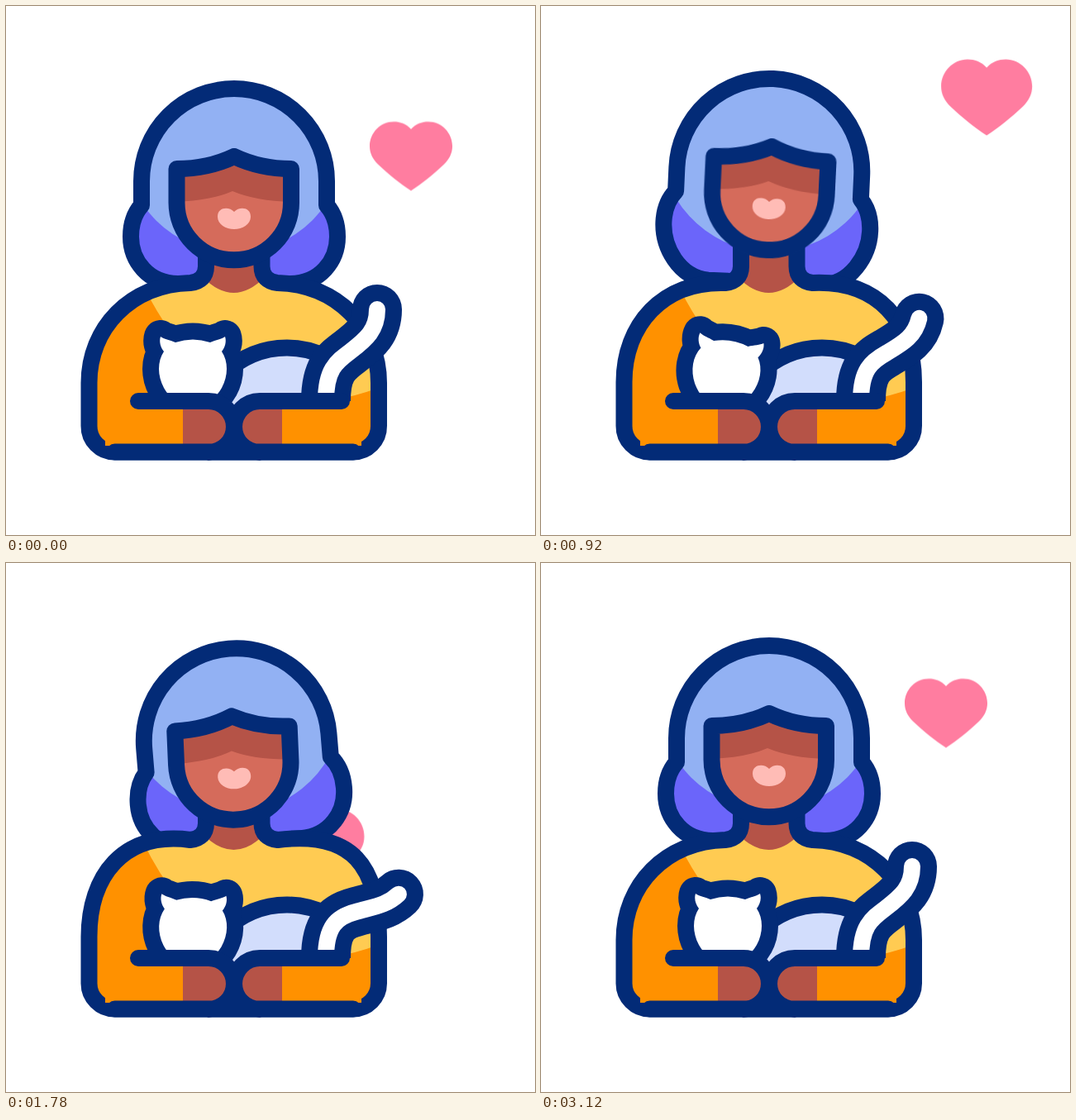
An HTML page for the animation above (3600 ms loop, 640 by 640 pixels).

```html
<!DOCTYPE html>
<html lang="en">
<head>
<meta charset="utf-8">
<title>Cuddling a cat</title>
<style>
html, body { margin: 0; width: 100%; height: 100%; overflow: hidden; background: #fff; }
svg { display: block; width: 100vw; height: 100vh; }

:root {
  --ink: #032b77; --hair: #92b1f3; --tips: #6b65fa; --skin: #d56b5b; --shade: #b55347;
  --lips: #ffbcb6; --shirt: #ffcb52; --sleeve: #ff9100; --fur: #d2ddfc; --love: #ff7da0;
}
.line { fill: none; stroke: var(--ink); stroke-width: 20; stroke-linecap: round; stroke-linejoin: round; }

.out, .in, .head, .locks, .strands, .crown, .face, .kitty, .torso, .tail {
  animation: 3600ms cubic-bezier(.37, 0, .63, 1) infinite;
}
.head { animation-name: bob; }
.locks { animation-name: swing; transform-origin: 276px 178px; }
.strands { animation-name: stretch; }
.crown { animation-name: slide; }
.face { animation-name: tilt; transform-origin: 276px 250px; }
.kitty { animation-name: nuzzle; transform-origin: 226px 445px; }
.torso { animation-name: shrug; }
.tail { animation-name: wag; fill: none; stroke-linecap: round; }

/* one heart floats away while the next rises from behind the shoulder */
.heart {
  fill: var(--love);
  d: path("M0 -32.5 C-6 -39 -13 -41.5 -21 -41.5 C-37 -41.5 -50 -28 -50 -12 C-50 -3 -46 4 -40 10 C-26 23 -14 33 0 42 C14 33 26 23 40 10 C46 4 50 -3 50 -12 C50 -28 37 -41.5 21 -41.5 C13 -41.5 6 -39 0 -32.5Z");
}
.out { animation-name: leave, beatOut, fade; animation-timing-function: cubic-bezier(.333, 0, .667, 1), cubic-bezier(.37, 0, .63, 1), linear; }
.in { animation-name: arrive, beatIn, appear; animation-timing-function: cubic-bezier(.333, 0, .667, 1), cubic-bezier(.37, 0, .63, 1), step-end; }

@keyframes leave { 0%, 1.11% { translate: 0 0; } 40.7%, 100% { translate: 73px -105.6px; } }
@keyframes beatOut { 0%, 20.8%, 42.22%, 100% { scale: 1; } 10.56%, 31.67% { scale: 1.25; } }
@keyframes fade { 0%, 32.22% { opacity: 1; } 38.89%, 100% { opacity: 0; } }
@keyframes arrive { 0%, 32.22% { translate: -150px 217px; } 85%, 100% { translate: 0 0; } }
@keyframes beatIn { 0%, 44.44%, 65.56%, 86.67%, 100% { scale: 1; } 55%, 76.11% { scale: 1.25; } }
@keyframes appear { 0% { opacity: 0; } 38.89%, 100% { opacity: 1; } }

@keyframes bob {
  0%, .5%, 61.1%, 100% { translate: 0 0; }
  15.6% { translate: 0 10.3px; }
  25.6% { translate: 0 -12px; }
  36.1%, 46.1% { translate: 0 3.8px; }
}
@keyframes tilt {
  0%, .5%, 60%, 100% { rotate: 0deg; }
  15.5% { rotate: -5.6deg; }
  30% { rotate: 5deg; }
  41.67% { rotate: -4deg; }
}
@keyframes swing {
  0%, .5%, 75%, 100% { rotate: 0deg; translate: 0 0; }
  15.8% { rotate: -6.5deg; translate: 0 0; }
  25.6% { translate: 1.8px 0; }
  31.1% { rotate: 6.2deg; }
  34.4% { translate: -2.2px 0; }
  45.6% { rotate: -5.4deg; translate: 0 0; }
  63.9% { rotate: .8deg; }
}
/* the tips lag behind as the head rises */
@keyframes stretch {
  0%, 15.6%, 36.1%, 100% { d: path("M232 336 H208 C172 336 151 308 151 279 C151 262 156 250 164 241 V212 a112 112 0 0 1 224 0 V241 C396 250 401 262 401 279 C401 308 380 336 344 336 H320"); }
  25.6% { d: path("M232 347 H208 C172 345 151 309 151 279 C151 262 156 250 164 241 V212 a112 112 0 0 1 224 0 V241 C396 250 401 262 401 279 C401 309 380 345 344 347 H320"); }
}
@keyframes slide {
  0%, 15.6%, 36.1%, 100% { translate: 0 0; }
  25.6% { translate: 0 11px; }
}
@keyframes nuzzle {
  0%, .5%, 61.1%, 100% { translate: 0 0; rotate: 0deg; }
  15.7% { translate: 1px 8px; rotate: -12deg; }
  25.4% { translate: -2.5px 1px; }
  26.67% { rotate: 10deg; }
  34.7% { translate: 0 14px; }
  36.1% { rotate: -5deg; }
  48.9% { translate: 0 1.5px; rotate: 1.8deg; }
}
@keyframes shrug {
  0%, .5%, 63.9%, 100% { d: path("M242 284 V315 C242 327 235 334 223 335 C150 337 100.5 390 100.5 456 V508 A31 31 0 0 0 131.5 539.5 H420 A31 31 0 0 0 451 508 V456 C451 390 401.5 337 328.5 335 C316.5 334 309.5 327 309.5 315 V284"); }
  25.3% { d: path("M242 284 V315 C242 327 235 334 223 335 C147 332.5 100.5 386 100.5 455 V508 A31 31 0 0 0 131.5 539.5 H420 A31 31 0 0 0 451 508 V455 C451 382 407 331.5 328.5 335 C316.5 334 309.5 327 309.5 315 V284"); }
  15.6%, 33.9%, 47.2% { d: path("M242 284 V315 C242 327 235 334 223 335 C141 323.5 100.5 379 100.5 452 V508 A31 31 0 0 0 131.5 539.5 H420 A31 31 0 0 0 451 508 V452 C451 367 421 322.5 328.5 335 C316.5 334 309.5 327 309.5 315 V284"); }
}
@keyframes wag {
  0%, .5%, 60%, 100% { d: path("M387 478 C387 440 399 431 416.5 418 C436 403 449 392 449 367"); }
  15.7%, 43.3% { d: path("M387 478 C387 440 400 427 425 424 C450 421 465 424 486 415"); }
  29.5% { d: path("M387 478 C387 440 399 431 417 418.5 C437 404 450 393 451 369.5"); }
}
</style>
</head>
<body>
<svg viewBox="0 0 640 640">
  <defs>
    <clipPath id="hairClip"><path class="strands"/></clipPath>
    <clipPath id="faceClip"><path d="M206.5 197 C231 197 255 192 276 182 C297 192 321 197 345 197 V238 a69.25 69.25 0 0 1 -138.5 0Z"/></clipPath>
    <clipPath id="torsoClip"><path class="torso"/></clipPath>
  </defs>

  <g transform="translate(490 181.5)">
    <path class="heart out"/>
    <path class="heart in"/>
  </g>

  <g class="head">
    <g class="locks">
      <g clip-path="url(#hairClip)">
        <path fill="var(--tips)" d="M130 80 H420 V360 H130Z"/>
        <circle class="crown" cx="276" cy="165" r="133.5" fill="var(--hair)"/>
      </g>
      <path class="strands line"/>
    </g>
  </g>

  <g clip-path="url(#torsoClip)">
    <path fill="var(--shirt)" d="M90 280 H462 V545 H90Z"/>
    <path fill="var(--sleeve)" d="M158 320 Q180 372 212 410 V485 H395 V477 Q425 472 462 458 V545 H90 V320Z"/>
    <path fill="var(--shade)" d="M238 280 H313 V328 Q275.5 366 238 328Z"/>
  </g>
  <path class="torso line"/>

  <g class="head">
    <g class="face">
      <g clip-path="url(#faceClip)">
        <path fill="var(--skin)" d="M200 175 H352 V312 H200Z"/>
        <path fill="var(--shade)" d="M200 175 H352 V237 Q305 237 274 224 Q247 236 200 237Z"/>
      </g>
      <path class="line" d="M206.5 197 C231 197 255 192 276 182 C297 192 321 197 345 197 V238 a69.25 69.25 0 0 1 -138.5 0Z"/>
      <path fill="var(--lips)" d="M276 249 C270 242.5 256 243 256 255 C256 264 266 270 276 270 C286 270 296 264 296 255 C296 243 282 242.5 276 249Z"/>
    </g>
  </g>

  <path fill="var(--fur)" d="M262 446 C288 421 315 413.5 340 413.5 C358 413.5 372 417 388 425 V486 H262Z"/>
  <path class="line" d="M262 446 C288 421 315 413.5 340 413.5 C358 413.5 372 417 388 425"/>
  <path class="tail" stroke="var(--ink)" stroke-width="60"/>
  <path class="tail" stroke="#fff" stroke-width="20"/>
  <path class="kitty" fill="#fff" stroke="var(--ink)" stroke-width="40" stroke-linejoin="round" paint-order="stroke" d="M187 400 C191 403 198 404 205 407 Q226 400 247 407 C254 404 261 403 265 400 C267 406 265 413 261 418 C269 430 269 447 261 462 C254 474 243 484 226 484 C209 484 198 474 191 462 C183 447 183 430 191 418 C187 413 185 406 187 400Z"/>

  <path fill="var(--sleeve)" d="M120 478 H214 V532 H120Z M334 478 H430 V532 H334Z"/>
  <path fill="var(--shade)" d="M214 478 H245 a31 31 0 0 1 0 62 H214Z M334 478 H307 a31 31 0 0 0 0 62 H334Z"/>
  <path class="line" d="M160 478 H245 a31 31 0 0 1 0 62 M406 478 H307 a31 31 0 0 0 0 62 M131.5 539.5 H420"/>
</svg>
</body>
</html>
```
